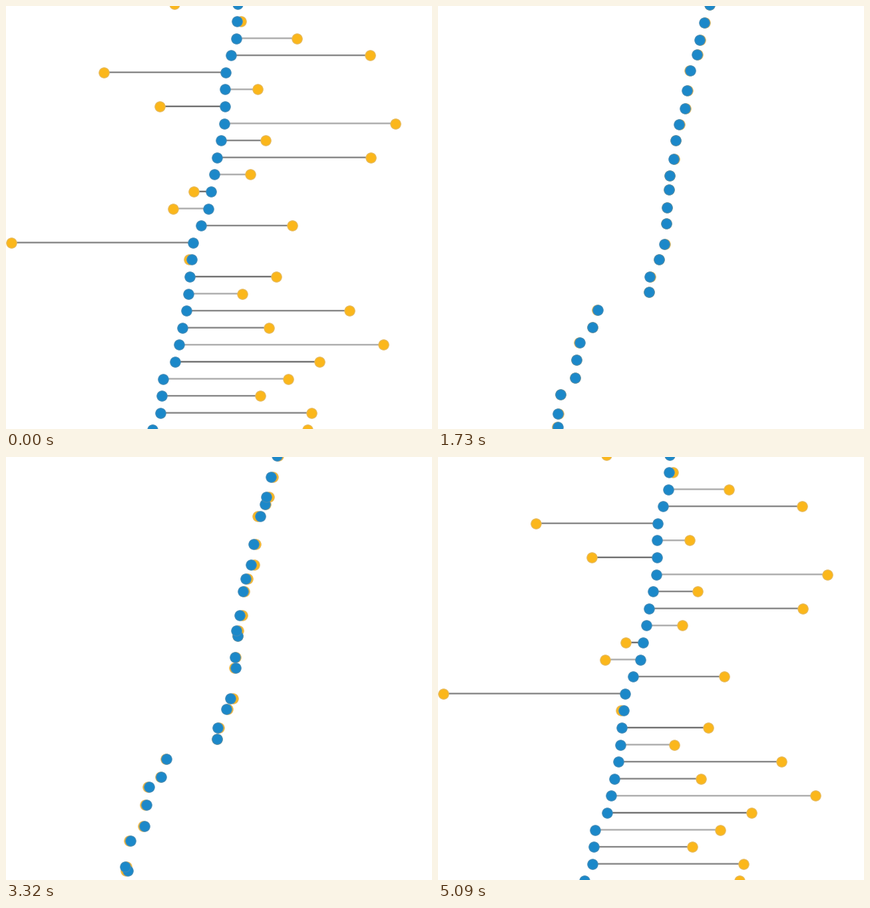
Animation, 640 px wide and 636 px high, one loop 5.13 s. Source, as a matplotlib script:

```python
import numpy as np
import matplotlib.pyplot as plt
from matplotlib.animation import FuncAnimation
from matplotlib.collections import LineCollection

W, H, DPI = 640, 636, 100
PX = 72 / DPI
LOOP, STEP, EASE_MS = 5130, 30, 1000
TOP, GAP = 22.9, 25.6      # y of row 0 and row spacing

# start in ms, goal (0 = ranked by blue, 1 = ranked by yellow), lag of the lines
MOVES = [(506, 1, 2), (1598, 0, -3), (2476, 1, 2), (3619, 0, 2)]

# The data: one yellow value per row; rows run on above and below the stage.
YELLOW = np.array([
    409, 604, 537, 526, 377, 500, 204, 485, 381, 456, 445, 257, 227, 420, 168, 253,
    353, 437, 547, 147, 378, 231, 585, 390, 548, 367, 282, 251, 430, 8, 275, 406,
    355, 516, 395, 567, 471, 424, 382, 459, 453, 404, 388, 375, 110, 80, 40, 228])
ROWS = np.arange(len(YELLOW)) - 16

# Blue falls steadily down the rows.
BLUE = np.interp(ROWS,
                 [-16, -12, -8, -2, 1, 3, 6, 8, 11, 13, 17, 20, 21, 23, 24, 25, 27, 31],
                 [558, 451, 404, 349, 346, 330, 328, 317, 304, 281, 271, 254, 236, 232,
                  220, 174, 155, 100])

# Ranked by yellow, both ends meet at the yellow value on a wider scale.
MERGED = 1.09 * YELLOW - 68.2
Y0 = TOP + GAP * ROWS
Y1 = TOP + GAP * ROWS[np.argsort(np.argsort(-YELLOW))]


def ease(u):
    u = min(max(u, 0), 1)
    return 4 * u**3 if u < 0.5 else 1 - 4 * (1 - u)**3


def progress(t, lag=0):
    """Share of the merged layout; each move takes over from the one before."""
    p = 0
    ends = [move[0] for move in MOVES[1:]] + [LOOP]
    for (start, goal, delay), end in zip(MOVES, ends):
        if t > start:
            p += (goal - p) * ease((min(t, end) - start - lag * delay) / EASE_MS)
    return p


def layout(p):
    """Blue ends and yellow ends as two point arrays."""
    y = Y0 + (Y1 - Y0) * p
    return [np.column_stack([x + (MERGED - x) * p, y]) for x in (BLUE, YELLOW)]


def line_greys(y):
    g = 0.57 + 0.13 * np.cos(2 * np.pi * (y - 0.4))
    return np.column_stack([g, g, g])


fig = plt.figure(figsize=(W / DPI, H / DPI), dpi=DPI, facecolor="white")
ax = fig.add_axes([0, 0, 1, 1])
ax.set(xlim=(0, W), ylim=(H, 0))
ax.axis("off")

lines = LineCollection([], linewidths=2.4 * PX, capstyle="butt", zorder=1)
lines.set_snap(False)
ax.add_collection(lines)


def dots(face, edge, z):
    d = ax.scatter(BLUE, Y0, s=(15.3 * PX)**2, c=face, edgecolors=edge,
                   linewidths=1.2 * PX, zorder=z)
    d.set_snap(False)
    return d


yellow = dots("#fbb71b", "#e6b95c", 2)
blue = dots("#1b88c9", "#418bb8", 3)


def draw(i):
    t = i * STEP
    for d, points in zip((blue, yellow), layout(progress(t))):
        d.set_offsets(points)
    ends = np.stack(layout(progress(t, lag=1)), axis=1)
    lines.set_segments(ends)
    lines.set_color(line_greys(ends[:, 0, 1]))
    return lines, yellow, blue


anim = FuncAnimation(fig, draw, frames=LOOP // STEP, interval=STEP,
                     repeat=True, repeat_delay=0, blit=False)
plt.show()
```
